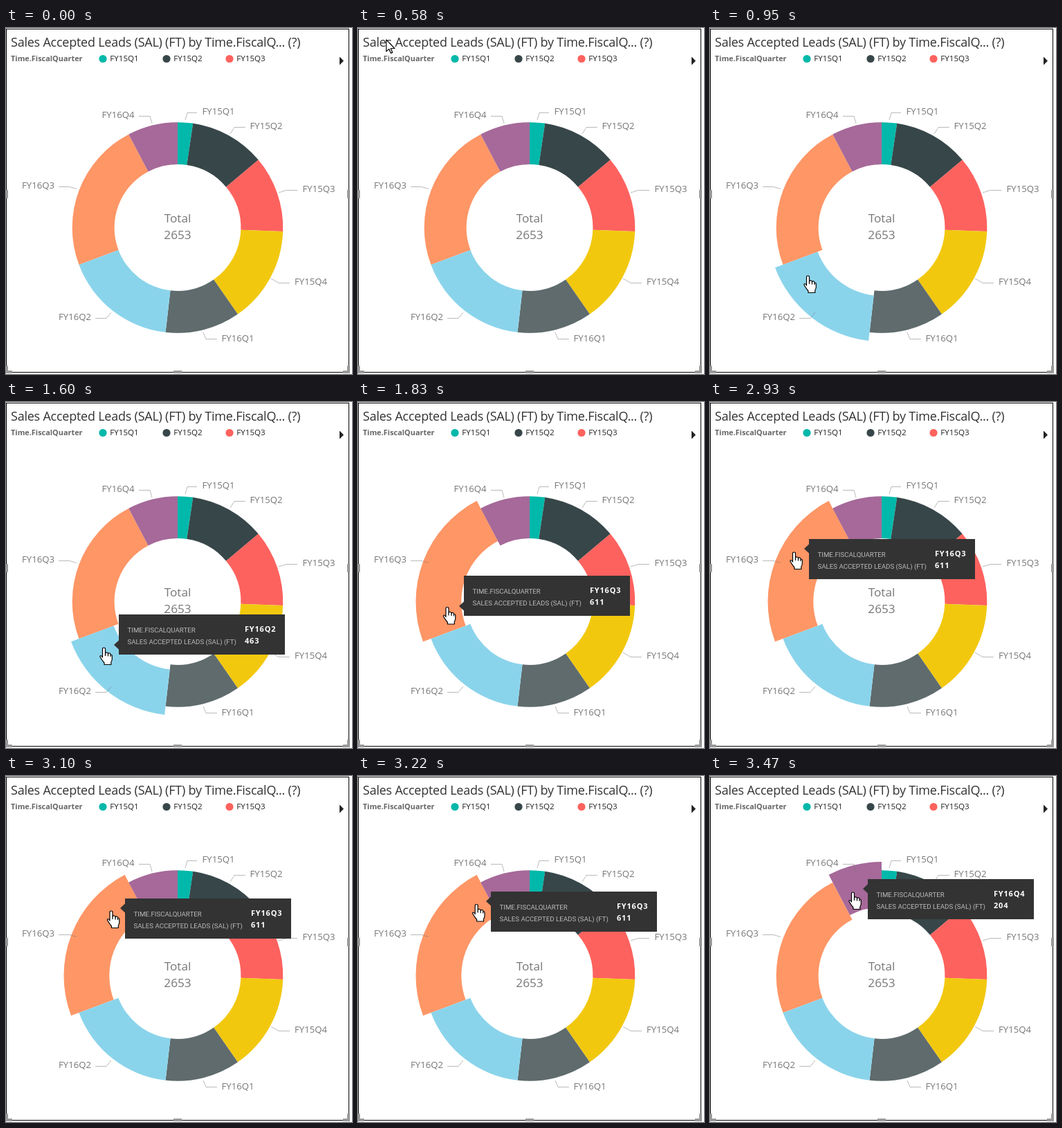
These frames come from a looping animation (500 px wide and 500 px high, 4070 ms). An HTML page:

```html
<!DOCTYPE html>
<html lang="en">
<head>
<meta charset="utf-8">
<title>Donut chart with tooltips</title>
<style>
  html, body { margin: 0; width: 100%; height: 100%; overflow: hidden; background: #fff; }
  svg { display: block; width: 100%; height: 100%; }
  text { font-family: "Open Sans", "Noto Sans", sans-serif; white-space: pre; }
  .title { font-size: 18px; letter-spacing: -.23px; fill: #333; }
  .legend-title { font-size: 10.9px; font-weight: 700; fill: #666; }
  .legend { font-size: 11.6px; fill: #222; }
  .label { font-size: 13.2px; fill: #777; }
  .total { font-size: 17.2px; fill: #777; text-anchor: middle; }
  .leader { fill: none; stroke: #777; stroke-opacity: .5; }
  .key { font: 9.7px Roboto, sans-serif; fill: #bbb; }
  .value { font-size: 11px; font-weight: 700; letter-spacing: .8px; fill: #fff; }
  .cursor { fill: #fff; stroke: #000; stroke-width: 1.2; stroke-linejoin: round; }
</style>
</head>
<body>
<svg id="stage" viewBox="0 0 500 500">
  <g id="frame">
    <rect x=".5" y="1.5" width="495" height="496" fill="#fff" stroke="#000"/>
    <path fill="#999" d="M0 234h3v12H0zM493 234h4v12h-4zM242 495h12v4h-12zM0 488h3v7h6v4H0zM497 488h-4v7h-6v4h10z"/>
  </g>
  <text class="title" x="7" y="27">Sales Accepted Leads (SAL) (FT) by Time.FiscalQ... (?)</text>
  <text class="legend-title" x="7" y="48">Time.FiscalQuarter</text>
  <path d="M482 41.5l6 6-6 6z" fill="#222"/>
  <g id="legend"></g>
  <g id="slices"></g>
  <g id="labels"></g>
  <text class="total" x="248" y="281">Total</text>
  <text class="total" x="248" y="305">2653</text>
  <g id="tip">
    <rect width="240" height="58" fill="#333"/>
    <path id="arrow" d="M.5-7L-7 0 .5 7z" fill="#333"/>
    <text class="key" x="12.5" y="25.5">TIME.FISCALQUARTER</text>
    <text class="key" x="12.5" y="42.5">SALES ACCEPTED LEADS (SAL) (FT)</text>
    <text class="value" id="tipName" x="182" y="25"></text>
    <text class="value" id="tipCount" x="182" y="42"></text>
  </g>
  <g id="cursor" class="cursor">
    <g id="hand">
      <path d="M-2.5 14V2Q-2.5 0-.5 0 1.5 0 1.5 2V8Q2 6.6 4 7 5.5 7.4 5.5 9 6 7.6 8 8 9 8.4 9 10 11.2 9.8 11.3 12V17Q11 19 9.8 21V24.5H0V22Q-3 18.5-5.6 14-6.8 12-5 11.5-3.8 11.5-2.5 14z"/>
      <path d="M1.5 8v4M5.5 9v3.5M9 10v3" fill="none"/>
    </g>
    <path id="pointer" d="M0 0V17L4 13.5 6.7 19.5 9 18.5 6.4 12.6H12z"/>
  </g>
</svg>
<script>
const LOOP = 4070, CX = 248, CY = 288.5, OUTER = 152.3, INNER = 91.4, GROW = 1.08;
const $ = id => document.getElementById(id);

// name, colour, end angle, count, label x/y, leader points
const slices = [
  ['FY15Q1', '#01b8aa', 8.4, 62, 283.5, 125, '259,133 262,122.5 276,122.5'],
  ['FY15Q2', '#374649', 50, 308, 352.5, 146, '324,153 330,143.5 346,143.5'],
  ['FY15Q3', '#fd625e', 92.1, 309, 428.5, 237, '394,238 405,234.5 421,234.5'],
  ['FY15Q4', '#f2c80f', 145.2, 391, 417, 371, '383,362 394,368.5 410,368.5'],
  ['FY16Q1', '#5f6b6d', 186.58, 305, 311.5, 453, '285,440 289,449.5 305,449.5'],
  ['FY16Q2', '#8ad4eb', 249.41, 463, 76, 422, '152,411 145,419.5 129,419.5'],
  ['FY16Q3', '#fe9666', 332.32, 611, 23, 232, '102,232.5 92,229.5 76,229.5'],
  ['FY16Q4', '#a66999', 360, 204, 138.5, 130, '211,138 208,127.5 192,127.5']
].map(([name, color, end, count, x, y, leader]) => ({ name, color, end, count, x, y, leader }));

function add(parent, tag, attrs, text) {
  const el = document.createElementNS('http://www.w3.org/2000/svg', tag);
  for (const k in attrs) el.setAttribute(k, attrs[k]);
  if (text) el.textContent = text;
  return parent.appendChild(el);
}

function ring(a, b, scale) {
  const at = (deg, r) => {
    const rad = deg * Math.PI / 180;
    return `${(CX + r * Math.sin(rad)).toFixed(2)} ${(CY - r * Math.cos(rad)).toFixed(2)}`;
  };
  const R = OUTER * scale, r = INNER * scale;
  return `M${at(a, R)}A${R} ${R} 0 0 1 ${at(b, R)}L${at(b, r)}A${r} ${r} 0 0 0 ${at(a, r)}Z`;
}

slices.forEach((s, i) => {
  s.start = i ? slices[i - 1].end : 0;
  s.path = add($('slices'), 'path', { fill: s.color });
  add($('labels'), 'polyline', { class: 'leader', points: s.leader });
  add($('labels'), 'text', { class: 'label', x: s.x, y: s.y }, s.name);
});
[140, 232, 323].forEach((x, i) => {
  add($('legend'), 'circle', { cx: x, cy: 44.5, r: 5.6, fill: slices[i].color });
  add($('legend'), 'text', { class: 'legend', x: x + 10.3, y: 48 }, slices[i].name);
});

// time, mouse x/y, tooltip x/y; the tooltip trails the mouse slightly
const path = [
  [540, 30, -20, 51, -25], [950, 142, 358, 163, 353], [1590, 142, 355, 163, 351],
  [1830, 129.5, 296.5, 153, 295], [2040, 122, 217, 143, 212], [2930, 122, 217, 143, 212],
  [3100, 152.5, 195, 172, 191], [3440, 207, 168, 228, 163]
];
// Moves: start, end, origin of the 40 ms grid
const moves = [[540, 950, 540], [1600, 2040, 1590], [2930, 3440, 2900]];
const tipTimes = [[1090, 1710], [1830, 3340], [3470, LOOP]];

function mouseAt(t) {
  const move = moves.filter(m => m[0] <= t).pop();
  if (!move) return null;
  const [, end, origin] = move;
  const q = t >= end ? end : origin + Math.floor((t - origin) / 40) * 40;
  const i = Math.max(1, path.findIndex(p => p[0] >= q));
  const a = path[i - 1], b = path[i], k = (q - a[0]) / (b[0] - a[0]);
  const [x, y, tipX, tipY] = [1, 2, 3, 4].map(n => a[n] + (b[n] - a[n]) * k);
  return { x, y, tipX: Math.round(tipX), tipY: Math.round(tipY) };
}

function sliceUnder({ x, y }) {
  const dx = x - CX, dy = y - CY, r = Math.hypot(dx, dy);
  if (r < INNER || r > OUTER * GROW) return null;
  const deg = (Math.atan2(dx, -dy) * 180 / Math.PI + 360) % 360;
  return slices.find(s => deg < s.end);
}

const show = (id, on) => $(id).setAttribute('visibility', on ? 'visible' : 'hidden');
const place = (id, x, y) => $(id).setAttribute('transform', `translate(${x.toFixed(1)} ${y.toFixed(1)})`);

function render(t) {
  const mouse = mouseAt(t), hot = mouse && sliceUnder(mouse);
  for (const s of slices) s.path.setAttribute('d', ring(s.start, s.end, s === hot ? GROW : 1));

  show('hand', hot);
  show('pointer', mouse && !hot);
  if (mouse) place('cursor', mouse.x, mouse.y);

  const tipOn = hot && tipTimes.some(([a, b]) => t >= a && t < b);
  $('tip').style.display = tipOn ? '' : 'none';
  if (!tipOn) return;
  const arrowY = mouse.y > 250 ? 44 : 14;
  place('tip', mouse.tipX, mouse.tipY - arrowY);
  place('arrow', 0, arrowY);
  $('tipName').textContent = hot.name;
  $('tipCount').textContent = hot.count;
}

const began = performance.now();
function tick() {
  render((performance.now() - began) % LOOP);
  requestAnimationFrame(tick);
}
tick();
</script>
</body>
</html>
```
